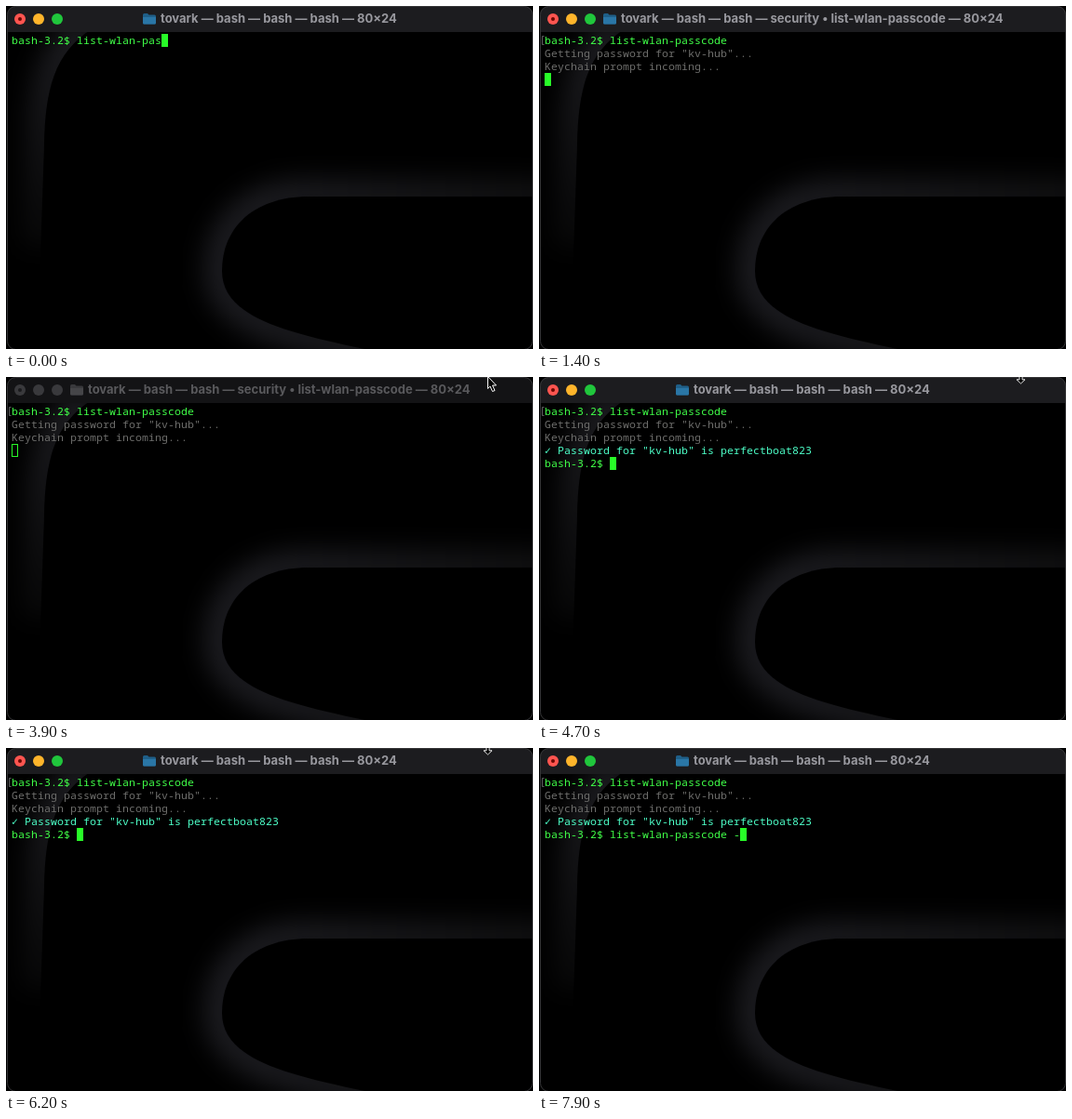
An HTML page that plays this animation: 566x369 px, repeating every 8 s.

```html
<!DOCTYPE html>
<html lang="en">
<head>
<meta charset="utf-8">
<title>Terminal</title>
<style>
  html, body { margin: 0; width: 100%; height: 100%; overflow: hidden; background: #000; }
  svg { display: block; width: 566px; height: 369px; }
  #rows text { font: 500 11.5px "Noto Sans Mono", "DejaVu Sans Mono", monospace; letter-spacing: .1px; white-space: pre; }
  #title { font: 700 13px Inter, sans-serif; }
  .typed { fill: #40ff48; }
  .info { fill: #6e6e6c; }
  .result { fill: #4dffc8; }
  .bar { fill: #1c1c1f; }
  .label { fill: #98989e; }
  #folder { fill: #1f5f88; }
  .front { fill: #2a76a6; }
  .blur .bar { fill: #131315; }
  .blur .label { fill: #59595c; }
  .blur #folder, .blur #lights circle { fill: #39393c; }
  .blur .front { fill: #454548; }
  .blur #lights .dot { fill: #1b1b1d; }
</style>
</head>
<body>
<svg id="stage" viewBox="0 0 566 369">
  <defs>
    <filter id="soft" x="-50%" y="-50%" width="200%" height="200%" color-interpolation-filters="sRGB">
      <feGaussianBlur stdDeviation="13"/>
    </filter>
    <linearGradient id="fade" gradientUnits="userSpaceOnUse" x1="200" x2="566">
      <stop offset=".2" stop-color="#1a1a1e"/>
      <stop offset="1" stop-color="#0f0f10"/>
    </linearGradient>
    <linearGradient id="fall" gradientUnits="userSpaceOnUse" x1="0" x2="0" y1="30" y2="270">
      <stop stop-color="#1c1c20"/>
      <stop offset="1" stop-color="#060606"/>
    </linearGradient>
    <clipPath id="frame"><rect x="1" width="565" height="370" rx="9"/></clipPath>
  </defs>
  <g clip-path="url(#frame)">
    <!-- faint glow seen through the window -->
    <g fill="none" stroke-width="40" filter="url(#soft)">
      <path stroke="url(#fall)" d="M92 25C52 50 42 90 41 150L36 260"/>
      <path stroke="url(#fade)" d="M620 205H325C270 205 232 235 232 285C232 335 300 352 400 372"/>
    </g>
    <path d="M92 25C52 50 42 90 41 150L36 300H190V25Z"/>
    <path d="M620 205H325C270 205 232 235 232 285C232 335 300 352 400 372H620Z"/>
    <rect class="bar" width="566" height="28"/>
  </g>
  <rect x="1.5" y=".5" width="564" height="369" rx="9" fill="none" stroke="#343436"/>

  <g id="lights">
    <circle cx="15" cy="14" r="6" fill="#ff5550"/>
    <circle class="dot" cx="15" cy="14" r="2" fill="#6b0800"/>
    <circle cx="35" cy="14" r="6" fill="#ffb52b"/>
    <circle cx="55" cy="14" r="6" fill="#20c63c"/>
  </g>
  <g id="folder">
    <path d="M0 9.5q0-1.5 1.5-1.5h3.5l1.5 1.5h6q1.5 0 1.5 1.5v7q0 1.5-1.5 1.5h-11q-1.5 0-1.5-1.5z"/>
    <path class="front" d="M0 12h14v6q0 1.5-1.5 1.5h-11q-1.5 0-1.5-1.5z"/>
  </g>
  <text id="title" class="label" y="18"></text>

  <g id="rows">
    <path id="mark" d="M5.5 32.5h-2v9h2" fill="none" stroke="#5e5e60"/>
    <text class="typed" x="6" y="41"></text>
    <text class="info" x="6" y="55"></text>
    <text class="info" x="6" y="69"></text>
    <text class="result" x="6" y="83"></text>
    <text class="typed" x="6" y="97"></text>
    <rect id="cursor" stroke="#28fc28"/>
  </g>

  <g stroke="#fff" stroke-linejoin="round">
    <path id="arrow" d="M517.5-.5V12.5L520 10L522.5 15.5L525 14.5L522.5 9H526.5Z" fill="#000"/>
    <path id="resize" d="M517.5 7L513 2.8H516V-2H519V2.8H522Z" fill="#000" stroke-width=".9"/>
  </g>
</svg>
<script>
const LOOP = 8000, CHAR = 7, LINE = 14;
const ENTER = 1000, INFO = 1300, PROMPT = 1500, DONE = 4600, RETYPE = 6300;
const command = "list-wlan-passcode", network = "kv-hub", user = "tovark";
const prompt = "bash-3.2$ ";

const $ = id => document.getElementById(id);
const rows = [...document.querySelectorAll("#rows text")];
const show = (id, on) => $(id).setAttribute("visibility", on ? "visible" : "hidden");
const set = (el, attrs) => {
  for (const key in attrs) el.setAttribute(key, attrs[key]);
};

function draw(t) {
  const running = t >= INFO && t < DONE;
  const blurred = t >= PROMPT && t < DONE;
  const typed = Math.min(command.length, 13 + Math.floor(t / 100));
  const retyped = t < RETYPE ? 0 : Math.min(20, 1 + Math.floor((t - RETYPE) / 84));

  const lines = [
    prompt + command.slice(0, typed),
    t >= INFO ? `Getting password for "${network}"...` : "",
    t >= INFO ? "Keychain prompt incoming..." : "",
    t >= DONE ? `✓ Password for "${network}" is perfectboat823` : "",
    t >= DONE ? prompt + (command + " -").slice(0, retyped) : ""
  ];
  rows.forEach((row, i) => row.textContent = lines[i]);

  const row = t < ENTER ? 0 : t < INFO ? 1 : t < DONE ? 3 : 4;
  const inset = blurred ? .5 : 0;
  set($("cursor"), {
    x: 6 + lines[row].length * CHAR + inset,
    y: 30 + row * LINE + inset,
    width: CHAR - 2 * inset,
    height: LINE - 2 * inset,
    fill: blurred ? "none" : "#28fc28",
    "stroke-width": blurred ? 1 : 0
  });

  $("stage").classList.toggle("blur", blurred);
  const task = running ? `security • ${command}` : "bash";
  $("title").textContent = `${user} — bash — bash — ${task} — 80×24`;
  set($("title"), { x: running ? 88 : 166 });
  set($("folder"), { transform: `translate(${running ? 69 : 147})` });

  show("mark", t >= ENTER);
  show("arrow", blurred);
  show("resize", t >= DONE && t < RETYPE);
}

const start = performance.now();
function tick() {
  draw((performance.now() - start) % LOOP);
  requestAnimationFrame(tick);
}
tick();
</script>
</body>
</html>
```
